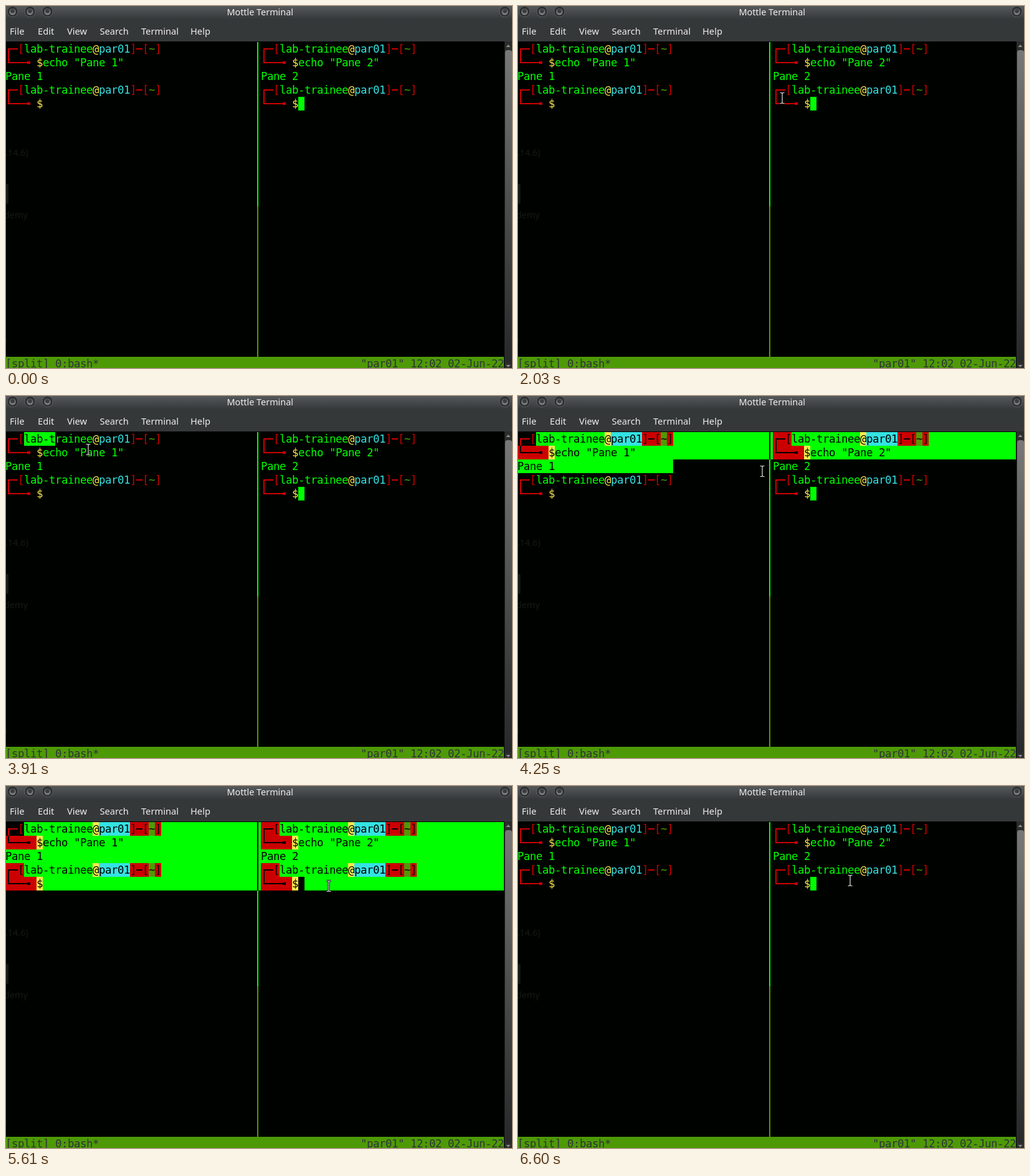
An HTML page that plays this animation: 812x582 px, repeating every 8000 ms.

```html
<!DOCTYPE html>
<html lang="en">
<head>
<meta charset="utf-8">
<title>Split panes</title>
<style>
  html, body { margin: 0; width: 100%; height: 100%; overflow: hidden; background: #000; }
  svg { display: block; width: 812px; height: 582px; }
  .mono { font: 17.33px "DejaVu Sans Mono", monospace; letter-spacing: -.433px; white-space: pre; }
  .ui { font: 14.67px "Noto Sans", "Open Sans", sans-serif; fill: #eeeeec; }
  .ghost { font: 14.4px "Noto Sans", "Open Sans", sans-serif; fill: #141915; }
</style>
</head>
<body>
<svg viewBox="0 0 812 582">
  <defs>
    <linearGradient id="bar" x2="0" y2="1">
      <stop offset="0" stop-color="#55595b"/><stop offset="1" stop-color="#36393a"/>
    </linearGradient>
    <linearGradient id="knob" x2="0" y2="1">
      <stop offset="0" stop-color="#47494a"/><stop offset="1" stop-color="#858788"/>
    </linearGradient>
    <linearGradient id="thumb" x2="0" y2="1">
      <stop offset="0" stop-color="#787878"/><stop offset=".5" stop-color="#4c4d4d"/>
      <stop offset="1" stop-color="#262929"/>
    </linearGradient>
    <clipPath id="picked"><path id="area"/></clipPath>
  </defs>

  <rect width="812" height="582" fill="#000200"/>
  <g class="ghost">
    <text x="-1" y="241">.14.6)</text>
    <text x="-3" y="341">demy</text>
    <text x="-3" y="542">)</text>
    <rect x="-4" y="286" width="8" height="32" rx="2"/>
  </g>

  <g id="plain"></g>
  <g id="inverse" clip-path="url(#picked)"></g>

  <rect y="564" width="799" height="18" fill="#4e9a06"/>
  <g class="mono" fill="#2e3436">
    <text x="-1" y="581">[split] 0:bash*</text>
    <text x="569" y="581">"par01" 12:02 02-Jun-22</text>
  </g>

  <rect width="812" height="21" fill="url(#bar)"/>
  <rect y="21" width="812" height="36" fill="#353839"/>
  <g id="knobs"></g>
  <text class="ui" x="407.7" y="15" text-anchor="middle" style="font-size:14.4px">Mottle Terminal</text>
  <g id="menu" class="ui"></g>

  <rect x="800" y="57" width="12" height="525" fill="#2b2d2d"/>
  <path d="M802.5 66l3.5-4 3.5 4z" fill="#8b8d8d"/>
  <rect x="801" y="71" width="11" height="502" rx="4" fill="url(#thumb)"/>
  <path d="M802.5 577l3.5 4 3.5-4z" fill="#8b8d8d"/>

  <path id="hand" fill="#fff" stroke="#111" stroke-width=".8"
    d="M4 14V2.5a2 2 0 0 1 4 0V9q3-1 3.5.8q3-.6 3 1q2-.2 2 1.8v5q0 2-1.5 4v2H6.5v-2L1 15.5q-1-2 .6-2.5t2.4 2z"/>
  <g id="beam" fill="none">
    <path d="M-3.5-8.5H-1L0-7.5 1-8.5H3.5M0-8V8M-3.5 8.5H-1L0 7.5 1 8.5H3.5" stroke="#000" stroke-width="3"/>
    <path d="M-3.5-8.5H-1L0-7.5 1-8.5H3.5M0-8V8M-3.5 8.5H-1L0 7.5 1 8.5H3.5" stroke="#e6e6e6" stroke-width="1.2"/>
  </g>
</svg>

<script>
const byId = id => document.getElementById(id);
const CELL = 10, LINE = 22, TOP = 58, RIGHT = 799, LOOP = 8000;
const GREEN = "#00ff00", RED = "#cc0000", YELLOW = "#fce94f", CYAN = "#34e2e2", OLIVE = "#4e9a06";
const colX = col => col * CELL - 1;
const rowY = row => TOP + row * LINE;

function add(parent, tag, attrs, text) {
  const node = document.createElementNS("http://www.w3.org/2000/svg", tag);
  for (const key in attrs) node.setAttribute(key, attrs[key]);
  if (text) node.textContent = text;
  parent.append(node);
  return node;
}

const plain = byId("plain"), inverse = byId("inverse");
const rect = (parent, x, y, width, height, fill) => add(parent, "rect", { x, y, width, height, fill });

// Coloured cells on black, and the same cells inverted for the selection.
function run(col, row, text, color) {
  const at = { class: "mono", x: colX(col), y: rowY(row) + 17 };
  add(plain, "text", { ...at, fill: color }, text);
  rect(inverse, colX(col), rowY(row), text.length * CELL, LINE, color);
  add(inverse, "text", { ...at, fill: "#000" }, text);
}

function prompt(col, row, command) {
  run(col, row, "  [", RED);
  run(col + 3, row, "lab-trainee", GREEN);
  run(col + 14, row, "@", YELLOW);
  run(col + 15, row, "par01", CYAN);
  run(col + 20, row, "] [", RED);
  run(col + 23, row, "~", OLIVE);
  run(col + 24, row, "]", RED);
  run(col, row + 1, "     ", RED);
  run(col + 5, row + 1, "$", YELLOW);
  if (command) run(col + 6, row + 1, command, GREEN);
  const d = `M${colX(col) + 4} ${rowY(row) + 10}h16v2h-14v20h29v-1h5v4h-5v-1h-31zm206 0h10v2h-10z`;
  add(plain, "path", { d, fill: RED });
  add(inverse, "path", { d, fill: "#000" });
}

rect(plain, 403, TOP, 2, 264, GREEN);
rect(plain, 403, 322, 2, 242, OLIVE);
rect(inverse, -1, TOP, RIGHT + 1, 5 * LINE, GREEN);
rect(inverse, 403, TOP, 2, 5 * LINE, "#000");
[0, 41].forEach((col, i) => {
  prompt(col, 0, `echo "Pane ${i + 1}"`);
  run(col, 2, `Pane ${i + 1}`, GREEN);
  prompt(col, 3);
});
rect(plain, colX(47), rowY(4), CELL, LINE, GREEN);
rect(inverse, colX(47), rowY(4), CELL, LINE, "#000");

for (const cx of [10.5, 38.5, 66.5, 800.5]) {
  add(byId("knobs"), "circle", { cx, cy: 9, r: 8.5, fill: "#292b2c", stroke: "#5d6061" });
  add(byId("knobs"), "circle", { cx, cy: 9, r: 5.5, fill: "url(#knob)" });
  add(byId("knobs"), "circle", { cx, cy: 8.5, r: 3, fill: "#393b3c" });
}
const menu = { File: 6, Edit: 51, View: 98, Search: 150.5, Terminal: 217, Help: 296 };
for (const name in menu) add(byId("menu"), "text", { x: menu[name], y: 46 }, name);

const linear = p => p, easeIn = p => p ** 1.6, easeOut = p => 1 - (1 - p) ** 1.6;
const smooth = p => p * p * (3 - 2 * p);

// Pointer moves: first step, last step, number of steps, end point, easing.
const START = [664, 456];
const MOVES = [
  [330, 940, 9, 476, 176, smooth],
  [1010, 1080, 2, 484, 162, linear],
  [1150, 1150, 1, 484, 160, linear],
  [1480, 1480, 1, 498, 163, linear],
  [1550, 1550, 1, 490, 160.5, linear],
  [1900, 2570, 11, 128, 90, smooth],
  [2770, 3370, 9, 31, 61, smooth],
  [3640, 4110, 8, 245, 113, easeIn],
  [4180, 4250, 2, 392, 121, linear],
  [4330, 4400, 2, 434, 130, linear],
  [4470, 4730, 5, 527, 144, easeOut],
  [4800, 4870, 2, 534, 152, linear],
  [4940, 5070, 3, 535, 157, easeOut],
  [5470, 5610, 3, 518, 161, smooth],
  [6200, 6600, 6, 533, 152, smooth]
];

function pointer(t) {
  let [x, y] = START;
  for (const [from, to, steps, endX, endY, ease] of MOVES) {
    if (t < from) break;
    const gap = (to - from) / (steps - 1) || 1;
    const done = Math.min(steps, Math.floor((t - from) / gap + .35) + 1);
    const p = ease(done / steps);
    x += (endX - x) * p;
    y += (endY - y) * p;
  }
  return [x, y];
}

// The selection trails the pointer slightly.
const LAG = 140, DRAG = 3640, CLEAR = 6400;
function selection(t) {
  if (t < DRAG + LAG || t >= CLEAR) return "";
  const [x, y] = pointer(Math.min(t - LAG, 5070));
  const last = Math.max(0, Math.min(4, Math.floor((y - TOP) / LINE)));
  const pastText = last === 4 && x > colX(48);
  const end = pastText ? RIGHT : colX(Math.floor((x + 1) / CELL) + 1);
  let d = "";
  for (let row = 0; row <= last; row++) {
    d += `M${row ? -1 : colX(3)} ${rowY(row)}H${row < last ? RIGHT : end}v${LINE}H${row ? -1 : colX(3)}z`;
  }
  return d;
}

function draw(t) {
  const [x, y] = pointer(t);
  const hand = t >= 330 && t < 1480, beam = t >= 1480;
  const place = `translate(${Math.round(x)} ${Math.round(y)})`;
  byId("hand").setAttribute("transform", place);
  byId("beam").setAttribute("transform", place);
  byId("hand").style.display = hand ? "" : "none";
  byId("beam").style.display = beam ? "" : "none";
  byId("area").setAttribute("d", selection(t));
}

const begin = performance.now();
function tick() {
  draw((performance.now() - begin) % LOOP);
  requestAnimationFrame(tick);
}
tick();
</script>
</body>
</html>
```
